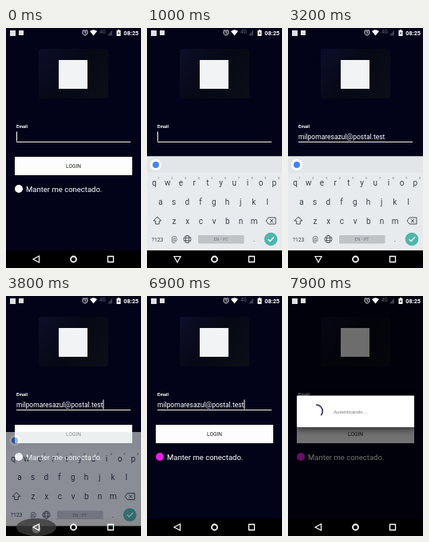
An HTML page with a canvas that plays this animation: 169x300 px, repeating every 8 s.

```html
<!DOCTYPE html>
<html lang="pt">
<head>
<meta charset="utf-8">
<style>
html, body { margin: 0; width: 100%; height: 100%; overflow: hidden; background: #020319; }
canvas { display: block; width: 100vw; height: 100vh; }
</style>
</head>
<body>
<canvas id="stage"></canvas>
<script>
const W = 169, H = 300, LOOP = 8000, NAV_TOP = 278;
const USER = 'milpomaresazul', DOMAIN = '@postal.test';
const BACKGROUND = '#020319', INK = '#3a444a';
const canvas = document.getElementById('stage');
const layerCanvas = document.createElement('canvas');
let ctx = canvas.getContext('2d');

const between = (t, from, to) => t >= from && t < to;
const progress = (t, from, to) => Math.min(1, Math.max(0, (t - from) / (to - from)));
const easeOut = p => 1 - (1 - p) ** 2;

function rect(x, y, w, h, fill) {
  ctx.fillStyle = fill;
  ctx.fillRect(x, y, w, h);
}
function roundRect(x, y, w, h, r, fill) {
  ctx.fillStyle = fill;
  ctx.beginPath();
  ctx.roundRect(x, y, w, h, r);
  ctx.fill();
}
function circle(x, y, r, fill) {
  ctx.fillStyle = fill;
  ctx.beginPath();
  ctx.arc(x, y, r, 0, Math.PI * 2);
  ctx.fill();
}
function path(d, x, y, { fill, stroke, width = 1, angle = 0 }) {
  ctx.save();
  ctx.translate(x, y);
  ctx.rotate(angle);
  const shape = new Path2D(d);
  if (fill) { ctx.fillStyle = fill; ctx.fill(shape); }
  if (stroke) { ctx.strokeStyle = stroke; ctx.lineWidth = width; ctx.stroke(shape); }
  ctx.restore();
}
function text(str, x, y, size, fill, { align = 'left', weight = 400 } = {}) {
  ctx.font = `${weight} ${size}px Roboto, sans-serif`;
  ctx.textAlign = align;
  ctx.fillStyle = fill;
  ctx.fillText(str, x, y);
  return ctx.measureText(str).width;
}
function clipped(x, y, w, h, draw) {
  ctx.save();
  ctx.beginPath();
  ctx.rect(x, y, w, h);
  ctx.clip();
  draw();
  ctx.restore();
}
// Draws a group off screen, then blends it in as one picture.
function layer(alpha, draw) {
  const main = ctx;
  layerCanvas.width = canvas.width;
  layerCanvas.height = canvas.height;
  ctx = layerCanvas.getContext('2d');
  ctx.setTransform(main.getTransform());
  draw();
  ctx = main;
  ctx.save();
  ctx.resetTransform();
  ctx.globalAlpha = alpha;
  ctx.drawImage(layerCanvas, 0, 0);
  ctx.restore();
}
function touch(t, x, y, from, to) {
  if (between(t, from, to)) circle(x, y, 5.5, 'rgba(255,255,255,.7)');
}

function typedText(t) {
  if (t >= 2700) return USER + DOMAIN;
  return USER.slice(0, [1600, 1850, 2100].filter(at => t >= at).length);
}

// The caret toggles every half second, and stays on while typing.
const caretOn = t => between(t, 1600, 2700) || Math.floor((t + 900) / 500) % 2 === 1;

function drawStatusBar() {
  rect(5, 3, 7, 7, '#dfe1e6');
  rect(16, 3, 6, 6, '#dfe1e6');
  path('M0-3A3 3 0 1 1-.01-3M0-2V0L1.5 1M-3.5-2.2L-1.7-3.7M3.5-2.2L1.7-3.7', 99, 6, { stroke: '#fff', width: .9 });
  path('M0 4L-4.5-1.5Q0-5 4.5-1.5Z', 109.5, 5.5, { fill: '#fff' });
  text('4G', 121, 7, 6.5, '#626675', { align: 'center' });
  path('M-3 3.5L3 3.5L3-3.5Z', 130, 6, { fill: '#3a3e4d' });
  path('M-2.5 4V-3H-1V-4H1V-3H2.5V4Z', 141, 6, { fill: '#fff' });
  path('M.7-2L-1.2.8H0L-.6 3L1.3 0H.1Z', 141, 6, { fill: BACKGROUND });
  text('08:25', 166, 8.8, 7.3, '#fff', { align: 'right', weight: 700 });
}

function drawLogo() {
  const shade = ctx.createLinearGradient(41, 26, 128, 88);
  shade.addColorStop(0, '#0c0f2a');
  shade.addColorStop(.5, '#060814');
  shade.addColorStop(1, '#0c0e18');
  roundRect(41, 26, 87, 62, 4, shade);
  rect(66, 40, 36, 36, '#f2f3f5');
}

function drawForm(t) {
  text('Email', 13, 125, 5.6, '#fff', { weight: 700 });
  const width = text(typedText(t), 13, 139, 8.5, '#fff');
  rect(13, 142, 143, 1, '#f0f0f2');
  if (caretOn(t)) rect(13 + width, 129.5, 1, 12, '#fff');

  rect(11, 161, 147, 23, '#fdfdfd');
  if (between(t, 6600, 6900)) {
    const p = progress(t, 6550, 6900);
    clipped(11, 161, 147, 23, () =>
      circle(84.5, 172.5, 15 + 65 * p, `rgba(0,0,0,${.2 * (1 - p)})`));
  }
  text('LOGIN', 84.5, 175, 6.6, '#22242c', { align: 'center' });

  if (between(t, 4600, 5200)) {
    const grow = easeOut(progress(t, 4500, 4800));
    layer(1 - progress(t, 4900, 5200), () => circle(16, 201, 9 * grow, '#34374a'));
  }
  circle(16, 201, 5, t < 4700 ? '#fff' : '#e81ee8');
  text('Manter me conectado.', 25, 205, 9.5, '#fff');
}

function keyRow(letters, x, y) {
  [...letters].forEach((letter, i) =>
    text(letter, x + i * 16.7, y, 10, INK, { align: 'center' }));
}

function keyPreview(letter, x, y) {
  roundRect(x - 10, y - 43, 20, 53, 2, '#cfd5d8');
  text(letter, x, y - 26, 13, INK, { align: 'center' });
}

function drawSuggestions(t) {
  if (!between(t, 1600, 2700)) return;
  rect(60, 165, .6, 12, '#c3c9cc');
  rect(108, 165, .6, 12, '#c3c9cc');
  text(typedText(t), 39, 173.5, 7.5, '#626c72', { align: 'center' });
  text(USER, 84, 167.5, 5.8, INK, { align: 'center' });
  text(DOMAIN, 84, 175.5, 5.8, '#626c72', { align: 'center' });
}

function drawKeyboard(t) {
  rect(0, 160.5, W, 117.5, '#e8ebed');
  rect(0, 160.5, W, 20.5, '#e2e6e8');
  circle(11, 171, 7, '#fff');
  circle(11, 171, 4, '#4285f4');
  drawSuggestions(t);

  keyRow('qwertyuiop', 9, 197);
  [...'1234567890'].forEach((n, i) => text(n, 13.5 + i * 16.7, 189, 4, '#6b757b'));
  keyRow('asdfghjkl', 17, 220.5);
  keyRow('zxcvbnm', 34, 244.5);
  path('M0-5L5 0H2.3V4H-2.3V0H-5Z', 13, 241, { stroke: INK, width: .9 });
  path('M-6 0L-3-4H6V4H-3ZM-1-2L3 2M3-2L-1 2', 155, 241, { stroke: INK, width: .9 });
  text('?123', 13, 266.5, 6.8, INK, { align: 'center' });
  text('@', 34, 267, 8.5, INK, { align: 'center' });
  path('M0-4.5A4.5 4.5 0 1 1-.01-4.5M0-4.5A2.2 4.5 0 1 1-.01-4.5M-4-1.6H4M-4 1.6H4', 50.5, 264, { stroke: INK, width: .8 });
  roundRect(64, 259, 57.5, 10.5, 1, '#bfc4c7');
  text('EN • PT', 92.5, 266.2, 5.4, '#737b80', { align: 'center' });
  text('.', 134, 267, 9, INK, { align: 'center' });
  circle(155, 264, 8.3, '#4db6ac');
  path('M-3.5 0L-1 2.5L4-2.8', 155, 264, { stroke: '#fff', width: 1.3 });

  if (between(t, 1500, 1700)) keyPreview('m', 134, 241);
  if (between(t, 1800, 2000)) keyPreview('i', 126, 193);
  if (between(t, 2100, 2300)) keyPreview('l', 151, 217);
}

function drawKeyboardLayer(t) {
  if (!between(t, 600, 4000)) return;
  const shown = t < 3000 ? easeOut(progress(t, 550, 900)) : 1 - progress(t, 3600, 4000);
  layer(shown ** .75, () => {
    ctx.translate(0, 19 * (1 - shown));
    drawKeyboard(t);
  });
}

function drawNavButtons(t) {
  if (between(t, 3600, 4200)) {
    const grow = easeOut(progress(t, 3450, 3800));
    layer(.8 * (1 - progress(t, 3850, 4200)), () => {
      ctx.fillStyle = '#3b3b3b';
      ctx.beginPath();
      ctx.ellipse(38, 289, 25 * grow, 11 * grow, 0, 0, Math.PI * 2);
      ctx.fill();
    });
    layer(.4 * (1 - progress(t, 3700, 4000)), () => circle(38, 291, 5.5, '#fff'));
  }
  const turn = progress(t, 600, 850) - progress(t, 3600, 3800);
  path('M-4 0L3.5-4V4Z', 38, 289, { stroke: '#fff', width: 1.2, angle: -turn * Math.PI / 2 });
  circle(84.5, 289, 4.4, '#fff');
  circle(84.5, 289, 2.6, '#000');
  path('M-3.5-3.5H3.5V3.5H-3.5Z', 131, 289, { stroke: '#fff', width: 1.3 });
}

function drawDialog(t) {
  if (t < 7000) return;
  const shown = easeOut(progress(t, 6950, 7300));
  rect(0, 0, W, NAV_TOP, `rgba(0,0,0,${.55 * shown})`);
  layer(shown, () => {
    const scale = .9 + .1 * shown;
    ctx.translate(84.5, 144.5);
    ctx.scale(scale, scale);
    ctx.translate(-84.5, -144.5);
    ctx.shadowColor = 'rgba(0,0,0,.6)';
    ctx.shadowBlur = 8 * canvas.width / W;
    ctx.shadowOffsetY = 3 * canvas.height / H;
    roundRect(11, 124.5, 147, 39.5, 1, '#fff');
    ctx.shadowColor = 'transparent';
    text('Autenticando ...', 57, 147, 6.2, '#777');
    const phase = (t - 7900) / 1000;
    const start = -1.6 + phase * 5.5;
    const sweep = 2.3 + 1.4 * Math.sin(phase * 4.7);
    ctx.strokeStyle = '#25235c';
    ctx.lineWidth = 1.5;
    ctx.beginPath();
    ctx.arc(35.3, 144, 8, start, start + sweep);
    ctx.stroke();
  });
}

function drawTouches(t) {
  touch(t, 80, 137, 400, 600);
  touch(t, 134, 246, 1500, 1700);
  touch(t, 126, 201, 1800, 2200);
  touch(t, 145, 224, 2100, 2300);
  touch(t, 84, 171, 2700, 2800);
}

function render() {
  const ratio = devicePixelRatio || 1;
  const w = Math.round(innerWidth * ratio), h = Math.round(innerHeight * ratio);
  if (canvas.width !== w || canvas.height !== h) {
    canvas.width = w;
    canvas.height = h;
  }
  ctx.setTransform(w / W, 0, 0, h / H, 0, 0);
  const t = performance.now() % LOOP;
  rect(0, 0, W, H, BACKGROUND);
  drawLogo();
  drawForm(t);
  rect(0, NAV_TOP, W, H - NAV_TOP, '#000');
  drawKeyboardLayer(t);
  drawDialog(t);
  drawStatusBar();
  drawNavButtons(t);
  drawTouches(t);
  requestAnimationFrame(render);
}
render();
</script>
</body>
</html>
```
